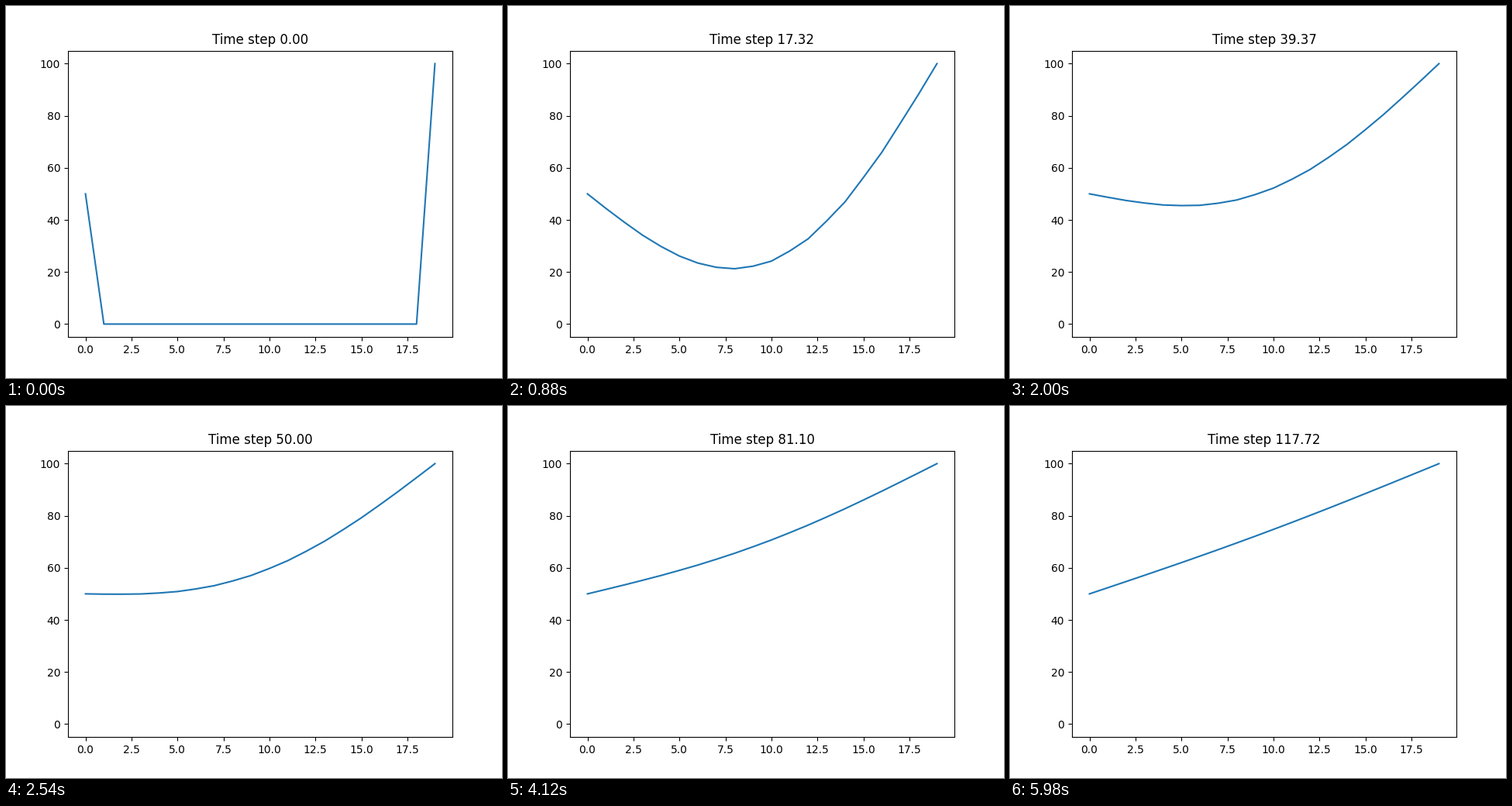
Animation, 640 px wide and 480 px high, one loop 6 s. Source, as a matplotlib script:

```python
import numpy as np
import matplotlib.pyplot as plt
from matplotlib.animation import FuncAnimation

FRAMES = 300
NODES = 20
DIFFUSIVITY = 1.27
DX = 1.0
DT = 0.5 * DX**2 / DIFFUSIVITY


def simulate():
    """Explicit heat equation on a rod with fixed end temperatures."""
    u = np.zeros(NODES)
    u[0], u[-1] = 50, 100
    states = [u]
    for _ in range(FRAMES - 1):
        u = u.copy()
        u[1:-1] += DIFFUSIVITY * DT / DX**2 * np.diff(u, 2)
        states.append(u)
    return states


states = simulate()

fig, ax = plt.subplots(figsize=(6.4, 4.8), dpi=100)
line, = ax.plot(states[0])
ax.set_xlim(-0.95, 19.95)
ax.set_ylim(-5, 105)
title = ax.set_title("Time step 0.00")


def update(i):
    line.set_ydata(states[i])
    title.set_text(f"Time step {i * DT:.2f}")
    return line, title


anim = FuncAnimation(fig, update, frames=FRAMES, interval=20,
                     repeat=True, repeat_delay=0)
plt.show()
```
